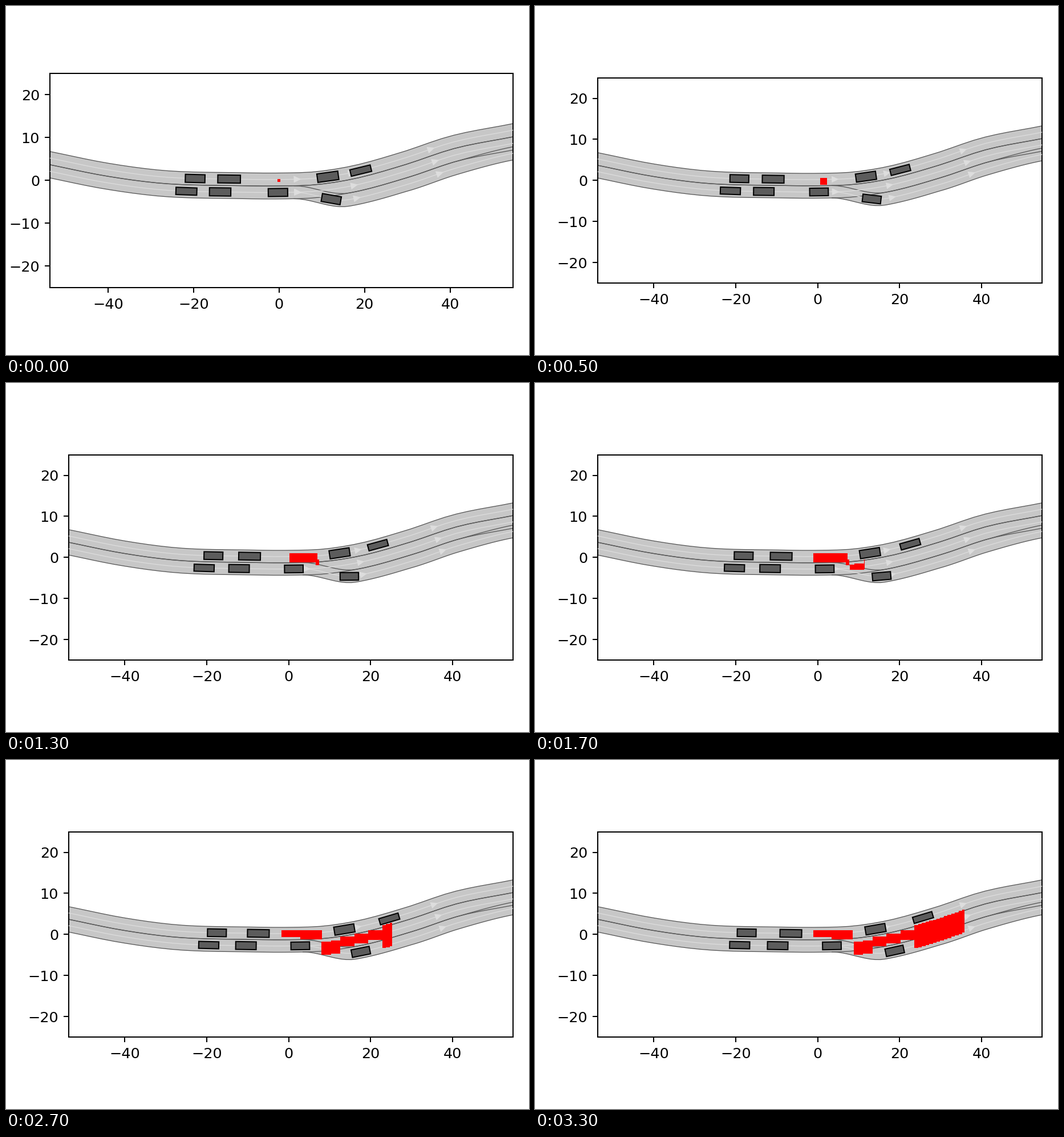
A matplotlib script for the animation above (3.4 s loop, 917 by 611 pixels).

```python
import numpy as np
import matplotlib.pyplot as plt
from matplotlib.animation import FuncAnimation
from matplotlib.collections import PolyCollection
from matplotlib.patches import Polygon

FRAMES, DPI = 34, 183.4
SIZE = np.array([5, 10 / 3])
LANE_W = 3.03
XLIM = (-53.63, 54.8)

plt.rcParams["font.family"] = "DejaVu Sans"
fig = plt.figure(figsize=SIZE, dpi=DPI, facecolor="white")
ax = fig.add_axes([0.1, 0.1, 0.8, 0.8])
ax.set(xlim=XLIM, ylim=(-25, 25),
       xticks=range(-40, 41, 20), yticks=range(-20, 21, 10))


def place_axes(left):
    """Keep equal units and a fixed right margin."""
    w, h = SIZE * DPI
    width = w - 1.08 * 10 / 72 * DPI - left
    height = width * 50 / (XLIM[1] - XLIM[0])
    ax.set_position([left / w, 0.5 - height / h / 2, width / w, height / h])


# Road: one smooth divider, all lanes run parallel to it
KEY_X, KEY_Y = np.array([
    (-53.7, 3.68), (-40.8, 1.08), (-28.4, -0.6), (-10, -1.22), (0, -1.3),
    (8.4, -1.02), (16.3, 0.13), (29.5, 3.68), (40.6, 7.35), (54.8, 10.2)]).T
KEY_M = np.gradient(KEY_Y, KEY_X)


def divider(x):
    """Cubic Hermite curve through the key points."""
    i = np.clip(np.searchsorted(KEY_X, x) - 1, 0, len(KEY_X) - 2)
    h = KEY_X[i + 1] - KEY_X[i]
    u = (x - KEY_X[i]) / h
    bend = (1 - u) * KEY_M[i] - u * KEY_M[i + 1]
    jump = (KEY_Y[i + 1] - KEY_Y[i]) * (1 - 2 * u)
    return (KEY_Y[i] * (1 - u) + KEY_Y[i + 1] * u
            + u * (1 - u) * (h * bend - jump))


def slope(f, x):
    return (f(x + 0.05) - f(x - 0.05)) / 0.1


def ramp(x, a, b):
    u = np.clip((x - a) / (b - a), 0, 1)
    return u * u * (3 - 2 * u)


def lane_y(x, lane, across=0.5):
    """Height in a lane; across goes from 0 (left edge) to 1 (right edge)."""
    if lane < 2:
        left = LANE_W * (1 - lane)
    else:
        left = 0.75 * ramp(x, 41, 54.8) - LANE_W * ramp(x, 3.5, 16.5)
    return divider(x) + (left - across * LANE_W) * np.hypot(1, slope(divider, x))


def oriented(shape, x, lane):
    """Put a shape on a lane centre, turned along the lane."""
    a = np.arctan(slope(lambda s: lane_y(s, lane), x))
    c, s = np.cos(a), np.sin(a)
    return np.array(shape) @ [[c, s], [-s, c]] + [x, lane_y(x, lane)]


for lane in range(3):
    x = np.linspace(3.5 if lane == 2 else -53.7, 54.8, 40)
    left, mid, right = (lane_y(x, lane, a) for a in (0, 0.5, 1))
    ax.fill_between(x, left, right, fc="#c7c7c7", ec="none", zorder=1)
    for edge in (left, right):
        ax.plot(x, edge, color="#555555", lw=0.5, zorder=2)
    ax.plot(x, mid, color="#dddddd", lw=0.5, zorder=3)
    for station in (4.35, 17.6, 36.6):
        at = station - LANE_W * (1 - lane) * slope(divider, station)
        tri = oriented([(-0.85, 0.8), (0.9, 0), (-0.85, -0.8)], at, lane)
        ax.add_patch(Polygon(tri, fc="#dddddd", ec="none", zorder=3))

# Cars: lane, start x, first and last speed per step, length, width
CARS = [
    (0, -19.65, 0.120, 0.022, 4.6, 1.87),
    (0, -11.7, 0.174, 0.139, 5.3, 1.87),
    (1, -21.7, 0.085, 0.078, 4.9, 1.7),
    (1, -13.8, 0.137, 0.109, 5.0, 1.9),
    (1, -0.27, 0.122, 0.105, 4.55, 1.87),
    (2, 12.2, 0.200, 0.200, 4.5, 1.87),
    (0, 11.4, 0.078, 0.086, 4.95, 2.0),
    (0, 19.1, 0.210, 0.190, 4.9, 1.55),
]
cars = [ax.add_patch(Polygon([(0, 0)] * 3, fc="#5c5c5c", ec="black", lw=0.8, zorder=5))
        for _ in CARS]


def car_shape(t, lane, x, v0, v1, length, width):
    x += v0 * t + (v1 - v0) * t * t / (2 * (FRAMES - 1))
    corners = np.array([(-1, -1), (1, -1), (1, 1), (-1, 1)])
    return oriented(corners * (length / 2, width / 2), x, lane)


# Reachable area: a box that spreads, then a stepped band running down the lane
reach = PolyCollection([], fc="red", ec="none", zorder=6, snap=True)
ax.add_collection(reach)

# Band stretches: start, end, step, top and bottom measured from the divider
BAND = [(8.8, 13.4, 2.3, -0.9, -4.1),
        (13.4, 23.6, 3.4, -0.45, -2.8),
        (23.6, 36, 0.9, 0.2, -5.4)]


def lead_boxes(t):
    half = 0.33 + 0.02 * t * t
    x0 = max(0.3 * t - half, 0.1 * t - 4.4)
    x1 = min(0.3 * t + half, 0.077 * t + 6)
    top = min(0.33 + 0.06 * t, 1.05)
    low = max(-0.33 - 0.14 * t, -1.15)
    split = t > 23
    boxes = [(x0, x1, max(low, -0.6), top),
             (x0 + 4.5 * split, x1, low, 0)]
    if t >= 12 and not split:
        boxes.append((x1 - 0.4, x1 + 0.4, -1.85, -0.5))
    return boxes


def band_boxes(t):
    s = max(t - 13, 0)
    front = 7.3 + 0.95 * s + 0.0237 * s * s
    floor = -1.6 - 0.37 * s
    lag = 0.13 * (FRAMES - 1 - t)
    for start, end, step, top, low in BAND:
        for x in np.arange(start, end - 0.1, step):
            y = divider(x + step / 2)
            x0, x1 = max(x - lag, 7.9), min(x + step - lag, front)
            if x0 < x1:
                yield x0, x1, max(y + low, floor), y + top


def corners(x0, x1, y0, y1):
    return [(x0, y0), (x1, y0), (x1, y1), (x0, y1)]


def update(t):
    place_axes(110 if t else 77)
    for patch, car in zip(cars, CARS):
        patch.set_xy(car_shape(t, *car))
    reach.set_verts([corners(*b) for b in [*lead_boxes(t), *band_boxes(t)]])
    return [*cars, reach]


anim = FuncAnimation(fig, update, frames=FRAMES, interval=100, repeat=True,
                     repeat_delay=0, blit=False)
plt.show()
```
